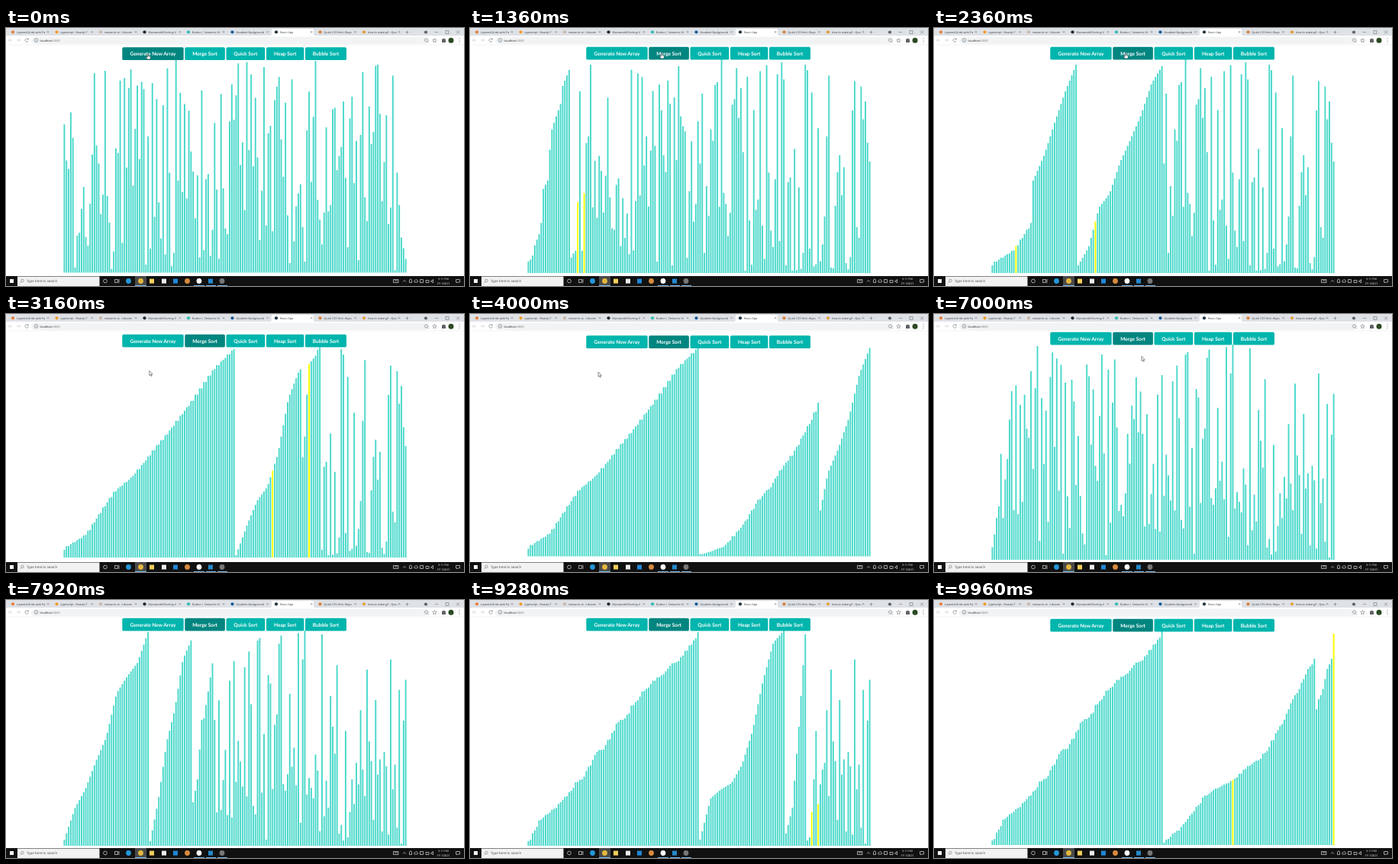
An HTML page for the animation above (10 s loop, 600 px wide and 338 px high).

```html
<!DOCTYPE html>
<html lang="en">
<head>
<meta charset="utf-8">
<title>Sorting visualizer</title>
<style>
  html, body { margin: 0; height: 100%; overflow: hidden; background: #fff; }
  svg { display: block; width: 100vw; height: 100vh; font-family: "Open Sans", sans-serif; text-rendering: geometricPrecision; }
  #buttons { font: 700 6.6px Lato, sans-serif; text-anchor: middle; }
  .line { fill: none; stroke: #6b6f74; stroke-width: .6; }
  .faint { stroke: #c0c3c6; }
  .tray { fill: none; stroke: #ddd; stroke-width: .7; }
</style>
</head>
<body>
<svg viewBox="0 0 600 338">
  <rect width="600" height="338" fill="#fff"/>
  <g id="bars"></g>
  <g id="buttons"></g>
  <g id="tabs">
    <rect width="600" height="10" fill="#dee1e6"/>
    <path d="M346 10q2 0 2-2V3q0-2 2-2h51q2 0 2 2v5q0 2 2 2z" fill="#fff"/>
  </g>
  <g id="toolbar">
    <rect y="10" width="600" height="12" fill="#fff"/>
    <rect x="33" y="11.5" width="522" height="9.4" rx="4.7" fill="#f1f3f4"/>
    <path class="line faint" d="M8 16H3.5m2-2-2 2 2 2M14 16h4.5m-2-2 2 2-2 2"/>
    <path class="line" d="M29 14.8a2.2 2.2 0 1 0 .2 2M29.4 13.4v1.7h-1.7M39.5 15.8v1.7m0-3v.5M552 17.6l1.6 1.6M525.5 3.5v4M523.5 5.5h4M562 5.5h4M576 3.5h4v4h-4zM590 3.5l4 4m0-4-4 4"/>
    <circle class="line" cx="39.5" cy="16" r="2.4"/>
    <circle class="line" cx="550.5" cy="16" r="2"/>
    <path class="line" d="M561.5 13.5l.8 1.8 1.9.2-1.4 1.3.4 1.9-1.7-1-1.7 1 .4-1.9-1.4-1.3 1.9-.2z"/>
    <path d="M571 14.5h1.5a1 1 0 0 1 2 0h1.5v4.5h-5z" fill="#5f6368"/>
    <path d="M594 13.5h.01m-.01 2.5h.01m-.01 2.5h.01" stroke="#5f6368" stroke-linecap="round"/>
    <path d="M0 22h600" stroke="#e4e6e8" stroke-width=".5"/>
  </g>
  <g id="taskbar">
    <rect y="325" width="600" height="13" fill="#111"/>
    <rect x="5" y="329" width="5" height="5" fill="#fff"/>
    <rect x="15" y="325.5" width="107.5" height="12.5" fill="#f2f2f2"/>
    <circle class="line" cx="21.5" cy="331" r="1.8"/>
    <path class="line" d="M20.2 332.4l-1.7 1.9"/>
    <circle class="tray" cx="130" cy="331.5" r="2.4"/>
    <path class="tray" d="M142.5 329.5h4v4h-4zM148 329v5"/>
    <rect x="169" y="325" width="15" height="13" fill="#4a4a4a"/>
    <path d="M169 337.5h15m62 0h14m2 0h13m2 0h13" stroke="#76b9ed"/>
    <path class="tray" d="M507.5 329.5h6.500v4h-6.500zM509 331h4M520 332.500l2-2 2 2M528.500 333.500v-3a1.500 1.500 0 0 1 3 0v3zM535 333a1.500 1.500 0 0 1 1-2.500 1.600 1.600 0 0 1 3 .5 1.200 1.200 0 0 1 0 2zM542.500 329.500h4v4h-4zM550 330.500h4v3h-4zM557 331h1l1.500-1.500v4.500l-1.500-1.500h-1zM589.500 329.500h5v3.500h-3l-1 1v-1h-1z"/>
  </g>
  <g id="cursor">
    <path id="arrow" d="M0 0v6.2l1.5-1.3 1 2.2.9-.4-1-2.1h1.9z" fill="#fff" stroke="#222" stroke-width=".5"/>
    <path id="hand" d="M-.7-3q.7-.8 1.3 0v2.700l2.300.6q.6.200.5 1l-.5 2.700h-3.600l-1.900-2.700q0-.9.900-.6l1 .7z" fill="#fff" stroke="#222" stroke-width=".5"/>
  </g>
</svg>
<script>
const $ = id => document.getElementById(id);

function add(parent, tag, attrs, text = "") {
  const el = document.createElementNS("http://www.w3.org/2000/svg", tag);
  for (const key in attrs) el.setAttribute(key, attrs[key]);
  el.textContent = text;
  return $(parent).appendChild(el);
}
const label = (parent, x, y, size, fill, text, more) =>
  add(parent, "text", { x, y, "font-size": size, fill, ...more }, text);
const dot = (parent, cx, cy, r, fill) => add(parent, "circle", { cx, cy, r, fill });

// Browser and desktop chrome
[["Layered Grids with Pa", "#e8803a"], ["typescript - Reactjs T", "#f0a030"],
 ["semantic-ui - Librarie", "#c9b9a8"], ["Marwendel/Sorting-V", "#24292e"],
 ["Button | Semantic UI", "#35bdb2"], ["Gradient Background", "#1b5e9c"],
 ["React App", "#20343c"], ["Quick CSS Hint: Ways", "#d9823b"],
 ["how to make gif - Quo", "#e0a03c"]].forEach(([title, color], n) => {
  const x = 9 + 57.5 * n;
  dot("tabs", x, 5.3, 2.1, color);
  label("tabs", x + 5, 6.7, 3.7, "#3c4043", title);
  add("tabs", "path", { d: `M${x + 45} 4.2l2.2 2.2m0-2.2l-2.2 2.2`, class: "line" });
});
dot("tabs", 550, 5.5, 2.1, "#5f6368");
dot("toolbar", 583, 16.2, 3.5, "#2c4a24");
label("toolbar", 44.5, 17.6, 3.9, "#202124", "localhost")
  .insertAdjacentHTML("beforeend", '<tspan fill="#777">:3000</tspan>');
label("taskbar", 27, 333.3, 4.4, "#444", "Type here to search");
label("taskbar", 573, 330.3, 3.6, "#fff", "5:11 PM", { "text-anchor": "middle" });
label("taskbar", 573, 336, 3.6, "#fff", "7/11/2021", { "text-anchor": "middle" });
[[160.5, "#2597d8"], [176.5, "#e5b73b"], [237.5, "#d98a3c"], [253, "#fff"], [283, "#777"]]
  .forEach(([x, color]) => dot("taskbar", x, 331.5, 3.4, color));
[[191, "#f5cf5a"], [207, "#eee"], [222, "#2088d8"], [268, "#2489ca"]]
  .forEach(([x, fill]) => add("taskbar", "rect", { x: x - 3, y: 328.6, width: 6, height: 6, fill }));

const buttons = [["Generate New Array", 152.3, 80.4], ["Merge Sort", 234.3, 52.6],
  ["Quick Sort", 288.5, 50.8], ["Heap Sort", 341, 49.4], ["Bubble Sort", 392, 54]]
  .map(([text, x, width]) => {
    const box = add("buttons", "rect", { x, y: 24.7, width, height: 16.9, rx: 1.9 });
    label("buttons", x + width / 2, 35.6, 6.6, "#fff", text);
    return box;
  });

// Random arrays: each section is a smooth range of bar tops in shuffled order
let seed = 7;
const random = () => (seed = seed * 16807 % 2147483647) / 2147483647;

function curve(count, ...tops) {
  return Array.from({ length: count }, (_, i) => {
    const at = i / (count - 1) * (tops.length - 1);
    const n = Math.min(Math.floor(at), tops.length - 2);
    return tops[n] + (tops[n + 1] - tops[n]) * (at - n);
  });
}
function mixed(count, ...tops) {
  const list = curve(count, ...tops);
  for (let i = count - 1; i > 0; i--) {
    const j = Math.floor(random() * (i + 1));
    [list[i], list[j]] = [list[j], list[i]];
  }
  return list;
}
const heights = (floor, ...sections) => sections.flat().map(top => floor - top);

const first = heights(321, mixed(155, 318, 245, 180, 104, 42), curve(5, 190, 275, 303));

const second = heights(321,
  mixed(40, 306, 293, 257, 224, 197, 165, 122, 82, 48),
  mixed(40, 311, 287, 235, 217, 176, 146, 114, 73, 50),
  mixed(40, 318, 280, 247, 228, 185, 112, 77, 60, 41),
  mixed(40, 318, 314, 307, 280, 212, 180, 140, 83, 48));

const third = heights(322,
  mixed(40, 314, 273, 248, 212, 180, 122, 100, 82, 42),
  mixed(20, 316, 262, 187, 144, 78, 53),
  mixed(5, 265, 235, 157), mixed(5, 155, 120, 83), mixed(10, 285, 275, 157, 80),
  mixed(40, 314, 260, 248, 240, 216, 172, 106, 56, 40),
  mixed(10, 306, 272, 166, 45), mixed(30, 319, 300, 250, 219, 208, 142, 78));

// Every write of an in-place merge sort, with the two bars compared for it
function mergeSteps(source) {
  const a = source.slice(), steps = [];
  (function sort(lo, hi) {
    if (lo === hi) return;
    const mid = lo + hi >> 1;
    sort(lo, mid);
    sort(mid + 1, hi);
    const old = a.slice();
    for (let k = lo, i = lo, j = mid + 1; k <= hi; k++) {
      const left = j > hi || i <= mid && old[i] <= old[j];
      steps.push({ k, value: a[k] = old[left ? i : j], i: i > mid ? j : i, j: j > hi ? i : j });
      left ? i++ : j++;
    }
  })(0, a.length - 1);
  return steps;
}

// Each run: when its array appears, when sorting starts, ms per write
const runs = [
  { from: 0, start: Infinity, pace: 3, data: first },
  { from: 280, start: 1013.3, pace: 2.985, data: second },
  { from: 6400, start: 6916.7, pace: 2.9982, data: third }
];
for (const run of runs) run.steps = mergeSteps(run.data);

const bars = first.map((_, i) => add("bars", "rect", { x: 75.5 + 2.8125 * i, width: 1.9 }));

// Pointer stops: time, x, y
const stops = [[250, 186, 37], [800, 251, 36], [2600, 251, 36], [3300, 172, 84], [4000, 168, 76],
  [4700, 168, 76], [5200, 186, 52], [5600, 189, 46], [5900, 190, 37], [6450, 190, 37],
  [6780, 252, 36], [6980, 252, 36], [7300, 572, 345]];

function pointer(t) {
  const n = stops.findIndex(stop => stop[0] > t);
  if (n < 1) return (n ? stops[stops.length - 1] : stops[0]).slice(1);
  const [t0, x0, y0] = stops[n - 1], [t1, x1, y1] = stops[n];
  const p = (t - t0) / (t1 - t0);
  return [x0 + (x1 - x0) * p, y0 + (y1 - y0) * p];
}

function draw(t) {
  const run = runs.filter(r => t >= r.from).pop();
  const { steps } = run, values = run.data.slice();
  const progress = Math.max(0, (t - run.start) / run.pace);
  const n = Math.floor(progress), phase = progress - n;
  steps.slice(0, n + (phase >= 2 / 3)).forEach(s => values[s.k] = s.value);
  const active = progress > 0 && phase < 1 / 3 && steps[n];

  // The page is centred vertically, so it shifts with the tallest bar
  const shift = (Math.max(...values) - 280) / 2;
  bars.forEach((bar, i) => {
    bar.setAttribute("y", 321 + shift - values[i]);
    bar.setAttribute("height", values[i]);
    bar.setAttribute("fill", active && (i === active.i || i === active.j) ? "#ffff00" : "#48d8ca");
  });
  $("buttons").setAttribute("transform", `translate(0 ${-shift})`);
  const dark = [t < 1013 || t > 5800 && t < 6917, t > 750 && t < 6400 || t > 6720];
  buttons.forEach((box, i) => box.setAttribute("fill", dark[i] ? "#00857f" : "#00b5ad"));

  const [x, y] = pointer(t);
  const onButton = y < 42;
  $("cursor").setAttribute("transform", `translate(${x} ${y})`);
  $("hand").style.display = onButton ? "" : "none";
  $("arrow").style.display = onButton ? "none" : "";
}

const began = performance.now();
(function frame() {
  draw(Math.round((performance.now() - began) / 40) * 40 % 10000);
  requestAnimationFrame(frame);
})();
</script>
</body>
</html>
```
